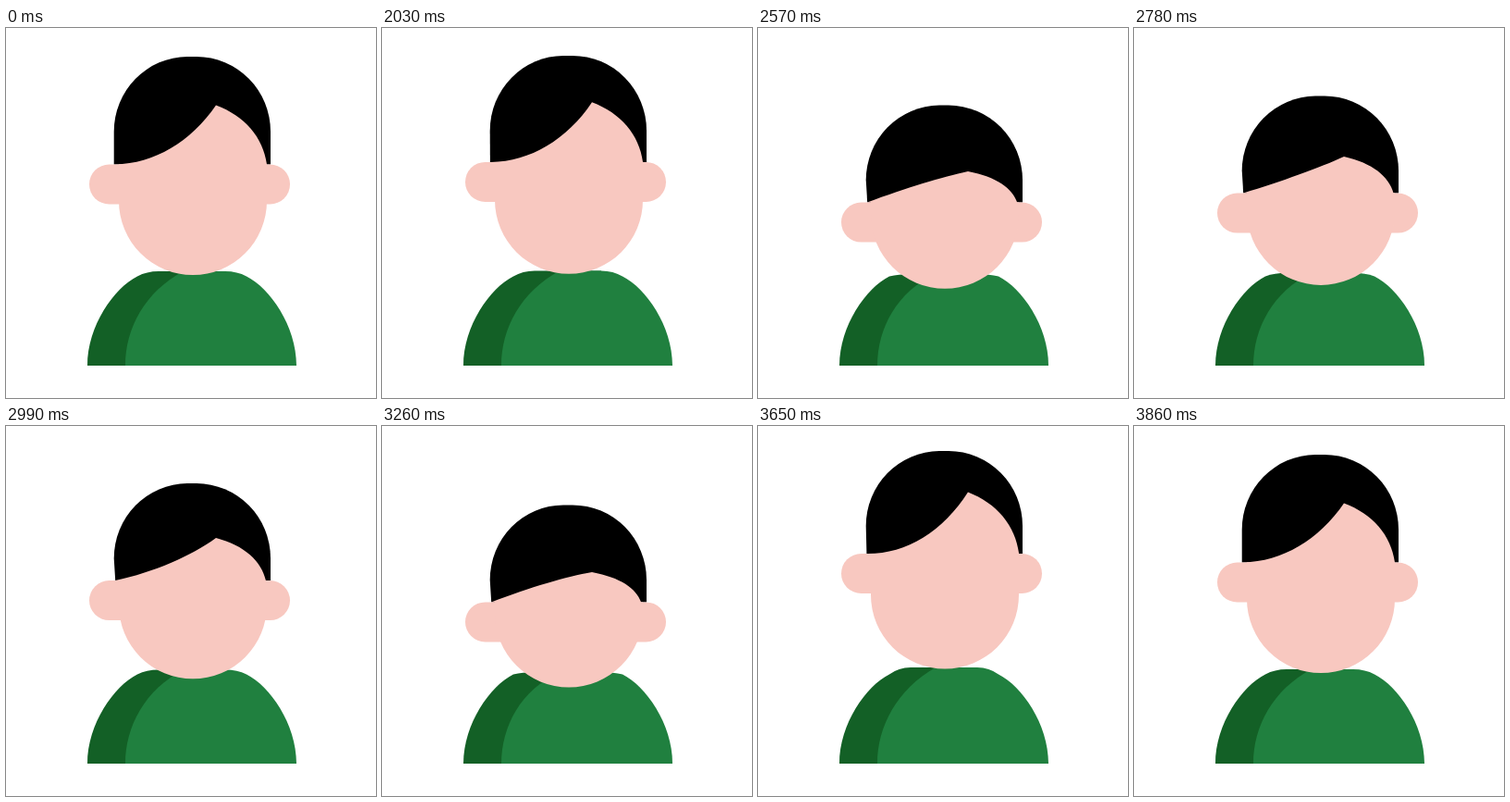
An HTML page that plays this animation: 400 px wide and 400 px high, repeating every 3.89 s.

```html
<!DOCTYPE html>
<html lang="en">
<head>
<meta charset="utf-8">
<title>Nodding man</title>
<style>
html, body { margin: 0; width: 100%; height: 100%; overflow: hidden; background: #fff; }
svg { display: block; width: 100%; height: 100%; }
</style>
</head>
<body>
<svg viewBox="0 0 400 400">
  <path id="shade" fill="#136026"/>
  <path id="shirt" fill="#20803f"/>
  <path id="hair"/>
  <g fill="#f8c8c0">
    <path id="ears" stroke="#f8c8c0" stroke-width="43" stroke-linecap="round" d="M111.5 169H285.5"/>
    <path id="face"/>
  </g>
</svg>
<script>
const LOOP = 3890, START = 2030, STEP = 30;
const [shade, shirt, hair, ears, face] =
  ['shade', 'shirt', 'hair', 'ears', 'face'].map(id => document.getElementById(id));

const linear = u => u;
const easeOut = u => 1 - (1 - u) ** 2;
const sine = u => (1 - Math.cos(Math.PI * u)) / 2;

// Keys: [time, value, easing into the key]
const nodKeys = [
  [2000, 0], [2210, -9.5, easeOut], [2620, 43, sine], [2945, 18.5, sine],
  [3275, 43, sine], [3650, -9.5, sine], [3860, 0, sine]
];
const squashKeys = [[2000, 0], [2240, 11.5, linear], [3490, 11.5, linear], [3800, 0, linear]];

function valueAt(keys, t) {
  if (t <= keys[0][0]) return keys[0][1];
  const i = keys.findIndex(k => t < k[0]);
  if (i < 0) return keys[keys.length - 1][1];
  const [t0, v0] = keys[i - 1], [t1, v1, ease] = keys[i];
  return v0 + (v1 - v0) * ease((t - t0) / (t1 - t0));
}

function draw(t) {
  const nod = valueAt(nodKeys, t), squash = valueAt(squashKeys, t);
  const tilt = .59 * nod + .54 * squash;       // extra drop of the parting
  const brow = 147.5 + nod, peak = 83.5 + nod + tilt;
  const top = 31 + nod + squash;
  const jaw = 187 + .395 * nod - .12 * squash;
  const collar = 263 + .12 * nod - .17 * squash;
  const bulge = 24 - .87 * tilt;
  const mix = u => brow + (peak - brow) * u;

  // The shoulders stay put while the collar rises and falls.
  shade.setAttribute('d', `M88 365C88 322 117 281 142 268.5Q152 ${collar} 165 ${collar}H237V365Z`);
  shirt.setAttribute('d', `M129 365C129 325 150 285 192 ${collar}H237
    Q250 ${collar} 260 268.5C285 281 314 322 314 365Z`);
  ears.setAttribute('transform', `translate(0 ${nod})`);
  hair.setAttribute('d', `M${116.7 + .13 * squash} ${brow}L116.7 ${top + 81}
    A80 81 0 0 1 196 ${top}H206A80 81 0 0 1 286 ${top + 81}V${brow}Z`);
  face.setAttribute('d', `M118 ${brow}C160 ${mix(.39) + bulge} 200 ${mix(.755) + bulge} 227 ${peak}
    C258 ${mix(.82)} ${278 - .1 * tilt} ${mix(.46)} ${282 - .06 * tilt} ${brow}
    H282V${jaw}A80 80 0 0 1 122 ${jaw}V${brow}Z`);
}

function tick() {
  const t = performance.now() % LOOP;
  draw(START + Math.floor((t - START) / STEP) * STEP);
  requestAnimationFrame(tick);
}
tick();
</script>
</body>
</html>
```
